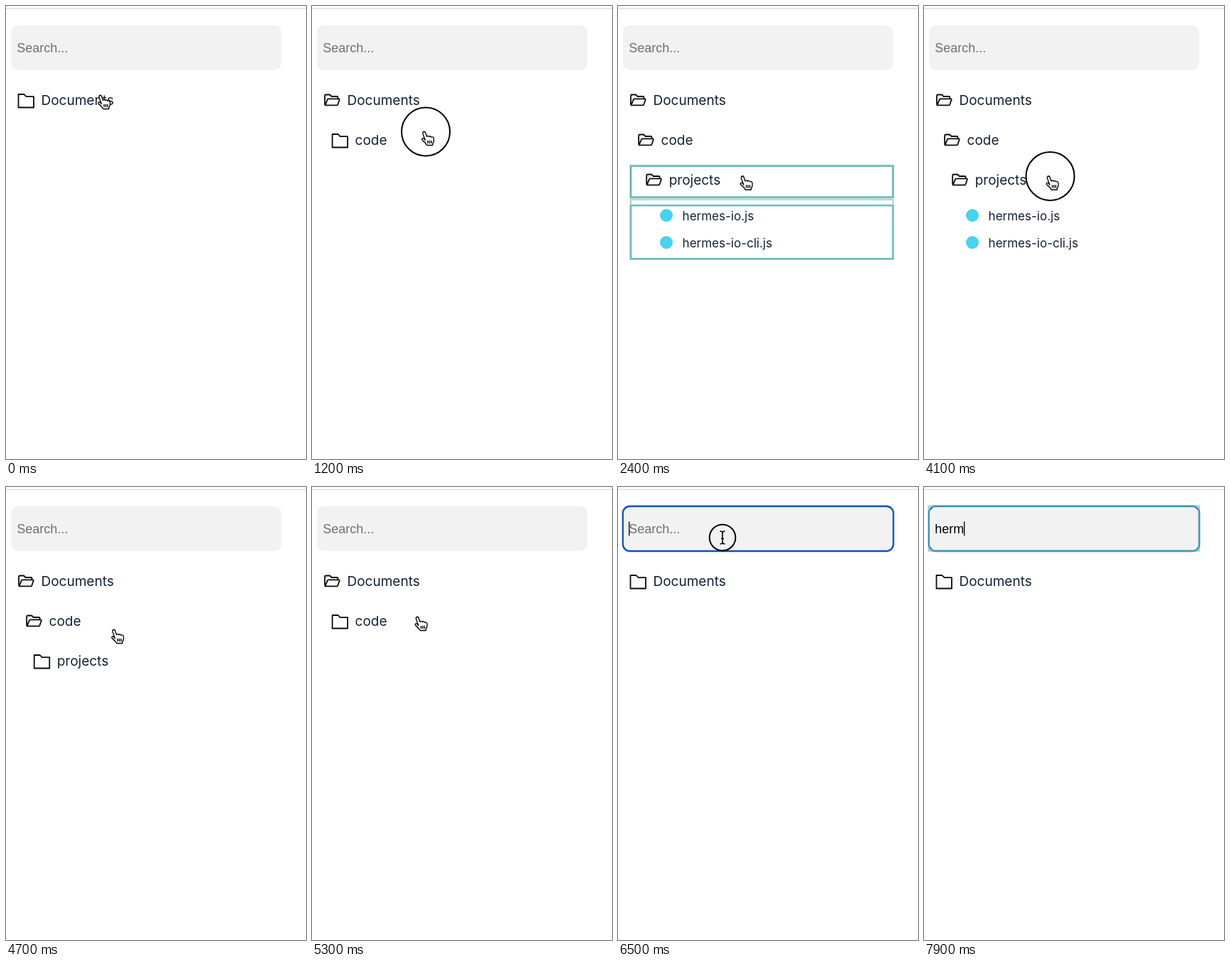
These frames come from a looping animation (422x636 px, 8 s). An HTML page:

```html
<!DOCTYPE html>
<html lang="en">
<head>
<meta charset="utf-8">
<title>File tree</title>
<style>
  html, body { margin: 0; width: 100%; height: 100%; overflow: hidden; background: #fff; }
  svg { display: block; width: 422px; height: 636px; fill: none; }
  text { font: 19px Inter, sans-serif; fill: #142233; }
  .file { font-size: 17px; }
  .field { font: 18px "Liberation Sans", Arial, sans-serif; fill: #000; }
  .hint { fill: #707070; }
  .icon { stroke: #0a0a0a; stroke-width: 1.8; stroke-linejoin: round; }
  .hand { fill: #fff; stroke: #000; stroke-width: 1.3; stroke-linejoin: round; }
  .beam { stroke: #000; stroke-width: 1.6; }
  .ring { stroke: #000; stroke-width: 2; }
</style>
</head>
<body>
<svg id="stage" viewBox="0 0 422 636"></svg>
<script>
const LOOP = 8000, STEP = 100;
const stage = document.getElementById('stage');

const folders = [
  { name: 'Documents', open: 300, close: 5700 },
  { name: 'code', open: 1400, close: 5000 },
  { name: 'projects', open: 2400, close: 4200 }
];
const files = ['hermes-io.js', 'hermes-io-cli.js'];
const listBottom = [235, 291, 355];

// pointer path: time, x, y
const path = [
  [0, 138, 135], [800, 138, 135], [1100, 163, 186], [1800, 163, 186],
  [2100, 180.5, 248.5], [4400, 180.5, 248.5], [4700, 157, 210], [4800, 157, 210],
  [4900, 153.5, 192], [5300, 153.5, 192], [5500, 150, 137], [5900, 150, 137],
  [6300, 147, 71], [LOOP, 147, 71]
];
// click rings: start, end, radius
const rings = [
  [200, 300, 34], [1200, 1400, 34], [2200, 2400, 34], [4100, 4200, 34],
  [4900, 5000, 18], [5600, 5700, 34], [6500, 6600, 18.3]
];
// typed text: time, letters, caret offset
const typing = [[0, '', 0], [7400, 'h', 10], [7600, 'he', 20], [7800, 'her', 26], [7900, 'herm', 41]];

const CLOSED = 'M17.5 124h8l3 3.2h10.5v15.3h-21.5z';
const OPENED = 'M18 138.5v-12.5q0-1.5 1.5-1.5h5.5l2.5 2.5h7.5q1.5 0 1.5 1.5v2.2' +
  'M18.5 139.3l3.2-8q.4-1 1.5-1h14.3q1.6 0 1.1 1.5l-2.3 6.5q-.4 1-1.5 1h-15.5q-1.3 0-.8-1z';
const HAND = 'M-3.5 2.5L-6.7-6.5Q-7-9.2-4.9-9.2Q-3.5-9-2.7-6L-1.4-2.5Q0-4.5 1.6-2.3' +
  'Q3.4-4 4.7-1.7Q7.8-2.8 8 1Q8.3 4.5 6.6 6.5L6.2 9H-1.2Q-3 5.5-7.4 2.2Q-8.4 0-6.4-.4Q-5-.2-3.5 2.5Z' +
  'M0 2.5v4M2.3 2.5v4M4.6 2.5v4';
const BEAM = 'M-3.5-9q3.5 0 3.5 2.5q0-2.5 3.5-2.5M0-6.5v13M-3.5 9q3.5 0 3.5-2.5q0 2.5 3.5 2.5M-2 1.5h4';

const within = (t, a, b) => t >= a && t < b;

function pointerAt(t) {
  const i = path.findIndex(p => p[0] > t);
  const [t0, x0, y0] = path[i - 1], [t1, x1, y1] = path[i];
  const k = (t - t0) / (t1 - t0);
  return [x0 + (x1 - x0) * k, y0 + (y1 - y0) * k];
}

function outline(x, top, bottom, alpha = 1) {
  const box = (width, color) =>
    `<rect x="${x}" y="${top}" width="${386.8 - x}" height="${bottom - top}" stroke="${color}" stroke-width="${width}"/>`;
  return `<g opacity="${alpha}">${box(4, '#cfe8e6')}${box(2, '#58b2ab')}</g>`;
}

function search(t) {
  const focused = t >= 6500;
  const [, value, offset] = typing.filter(s => t >= s[0]).pop();
  let out = '<rect x="6.8" y="27" width="380.6" height="63" rx="10" fill="#f2f2f2"' +
    (focused ? ' stroke="#0b55bd" stroke-width="2.3"/>' : '/>');
  out += value
    ? `<text class="field" x="15.3" y="64.5">${value}</text>`
    : '<text class="field hint" x="15.3" y="64.5">Search...</text>';
  if (focused && !within(t, 7000, 7400))
    out += `<path d="M${15.7 + offset} 48.5v20" stroke="#000" stroke-width="1.3"/>`;
  if (value) out += outline(6.8, 27, 89.5, 0.6);
  return out;
}

function tree(t) {
  let out = '', marks = '';
  for (const [depth, { name, open, close }] of folders.entries()) {
    const dx = depth * 11.1, dy = depth * 56;
    const isOpen = within(t, open, close);
    out += `<g transform="translate(${dx} ${dy})"><path class="icon" d="${isOpen ? OPENED : CLOSED}"/>` +
      `<text x="49.5" y="139">${name}</text></g>`;
    const age = t - (t >= close ? close : open);
    if (within(age, 0, 300)) {
      const x = dx - 4.3, alpha = age < 100 ? 1 : 0.65;
      const bottom = isOpen ? listBottom[depth] : dy + 168;
      marks += outline(x, dy + 159.5, bottom, alpha * 0.5);
      if (isOpen) marks += outline(x, dy + 168, bottom, alpha * 0.85);
      marks += outline(x, dy + 112.5, dy + 156.5, alpha);
    }
    if (!isOpen) return out + marks;
  }
  files.forEach((name, i) => {
    const y = 294 + i * 38;
    out += `<circle cx="68" cy="${y}" r="9" fill="#45d3f0"/><text class="file" x="90.6" y="${y + 6.5}">${name}</text>`;
  });
  return out + marks;
}

function pointer(t) {
  if (t >= 7400) return '';
  const [x, y] = pointerAt(t), beam = t >= 6300;
  let out = beam
    ? `<path class="beam" transform="translate(${x} ${y})" d="${BEAM}"/>`
    : `<path class="hand" transform="translate(${x} ${y}) scale(1.06)" d="${HAND}"/>`;
  const ring = rings.find(([a, b]) => within(t, a, b));
  if (ring) out += `<circle class="ring" cx="${beam ? x : x - 3}" cy="${beam ? y : y - 9.5}" r="${ring[2]}"/>`;
  return out;
}

const start = performance.now();
let shown = -1;
function draw() {
  const t = Math.floor((performance.now() - start) % LOOP / STEP) * STEP;
  if (t !== shown) {
    shown = t;
    stage.innerHTML = '<path d="M0 3.5h422" stroke="#dedede" stroke-width="1.5"/>' +
      search(t) + tree(t) + pointer(t);
  }
  requestAnimationFrame(draw);
}
draw();
</script>
</body>
</html>
```
